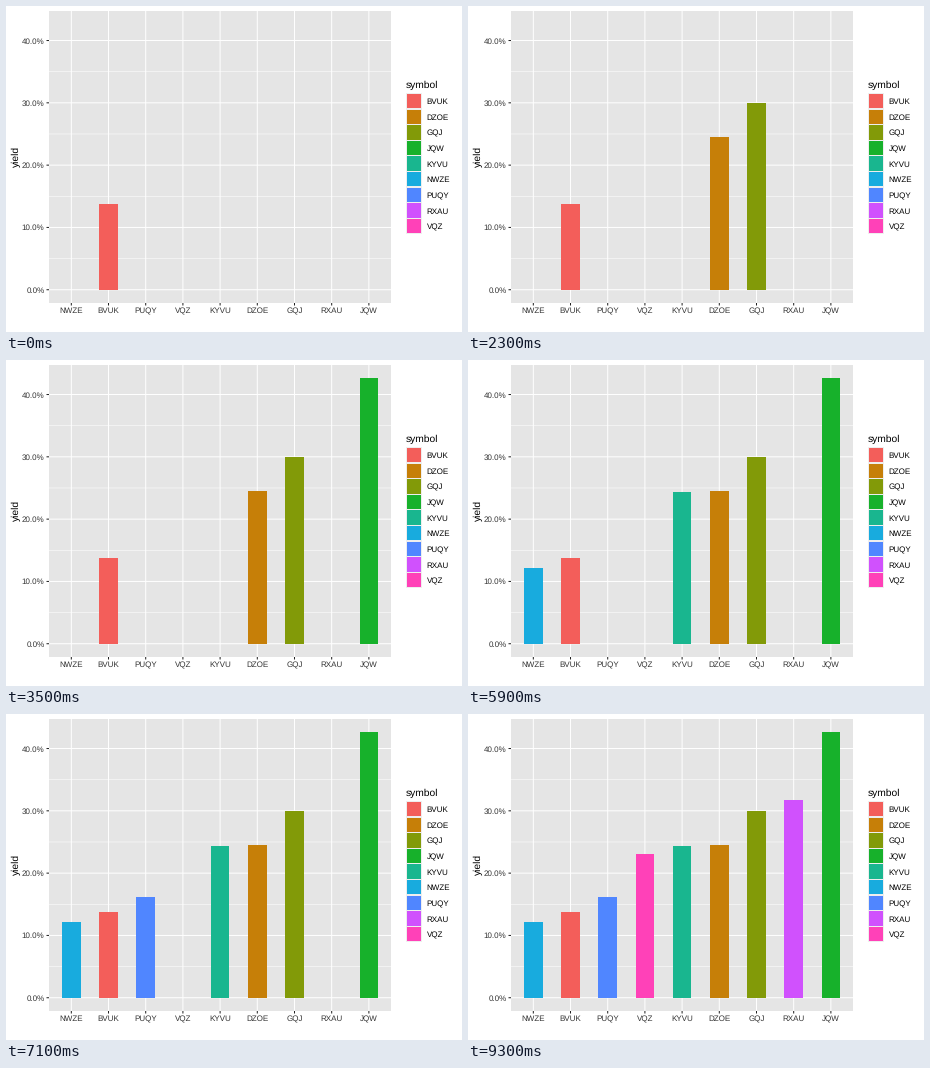
These frames come from a looping animation (456x326 px, 10000 ms). A matplotlib script:

```python
import matplotlib.pyplot as plt
from matplotlib.animation import FuncAnimation
from matplotlib.patches import Rectangle

W, H, DPI = 456, 326, 64
PX = 72 / DPI  # points per pixel
LEFT, RIGHT, TOP, BOTTOM = 43, 385.2, 5, 297
ZERO, PER_CENT = 283.73, 6.23
STEP = (RIGHT - LEFT) / 9.2
KEY, KEY_INSET = 15.66, 0.66
FRAME_MS, LOOP_MS = 100, 10000

# symbol: (colour, yield in percent, time the bar appears in ms), in legend order
SERIES = {
    "BVUK": ("#f35e5a", 13.8, 0),
    "DZOE": ("#c67f08", 24.5, 1100),
    "GQJ": ("#829a08", 29.97, 2300),
    "JQW": ("#17b12b", 42.6, 3500),
    "KYVU": ("#19b68f", 24.35, 4700),
    "NWZE": ("#18abde", 12.15, 5900),
    "PUQY": ("#5086ff", 16.15, 7100),
    "RXAU": ("#d051fd", 31.75, 8200),
    "VQZ": ("#ff41b8", 23.05, 9300),
}

plt.rcParams.update({"font.family": "Liberation Sans", "text.hinting": "none"})
fig = plt.figure(figsize=(W / DPI, H / DPI), dpi=DPI, facecolor="white")
ax = fig.add_axes([0, 0, 1, 1])
ax.set_xlim(0, W)
ax.set_ylim(H, 0)
ax.axis("off")


def rect(x0, y0, x1, y1, color, z=1):
    x0, y0, x1, y1 = map(round, (x0, y0, x1, y1))
    return ax.add_patch(Rectangle((x0, y0), x1 - x0, y1 - y0,
                                  facecolor=color, linewidth=0, zorder=z))


def line(x0, y0, x1, y1, color="white", width=1.0):
    ax.plot([x0, x1], [y0, y1], color=color, linewidth=width * PX,
            solid_capstyle="butt", snap=False, zorder=2)


def label(x, y, text, size=8, color="black", **kwargs):
    ax.text(x, y, text, fontsize=size * PX, color=color, va="baseline",
            rotation_mode="anchor", **kwargs)


def y_at(percent):
    return ZERO - PER_CENT * percent


def draw_panel(order):
    rect(LEFT, TOP, RIGHT, BOTTOM, "#e5e5e5")
    for percent in range(5, 45, 10):
        line(LEFT, y_at(percent), RIGHT, y_at(percent), width=0.5)
    for percent in range(0, 50, 10):
        y = y_at(percent)
        line(LEFT, y, RIGHT, y)
        line(LEFT - 2.5, y, LEFT, y, "#1f1f1f")
        label(38.5, y + 2.9, f"{percent:.1f}%", color="#343434", ha="right")
    for i, symbol in enumerate(order):
        x = LEFT + STEP * (0.6 + i)
        line(x, TOP, x, BOTTOM)
        line(x, BOTTOM, x, BOTTOM + 2.5, "#1f1f1f")
        label(x, 307, symbol, color="#343434", ha="center")
    label(12.6, 150, "yield", size=10.3, rotation=90, ha="center")


def draw_legend():
    x, y = 400.2, 87.19
    label(x, 81.6, "symbol", size=10.3)
    rect(x, y, x + KEY, y + KEY * len(SERIES), "#eeeeee")
    for i, (symbol, (color, _, _)) in enumerate(SERIES.items()):
        top = y + i * KEY
        rect(x + KEY_INSET, top + KEY_INSET,
             x + KEY - KEY_INSET, top + KEY - KEY_INSET, color, z=2)
        label(x + KEY + 4.8, top + KEY / 2 + 3.1, symbol)


def make_bars(order):
    bars = []
    for i, symbol in enumerate(order):
        color, percent, start = SERIES[symbol]
        x = LEFT + STEP * (0.35 + i)
        bars.append((rect(x, y_at(percent), x + STEP / 2, ZERO, color, z=3), start))
    return bars


ranking = sorted(SERIES, key=lambda s: SERIES[s][1])
draw_panel(ranking)
draw_legend()
bars = make_bars(ranking)


def update(frame):
    for bar, start in bars:
        bar.set_visible(frame * FRAME_MS >= start)
    return [bar for bar, _ in bars]


anim = FuncAnimation(fig, update, frames=LOOP_MS // FRAME_MS,
                     interval=FRAME_MS, repeat=True, repeat_delay=0)
plt.show()
```
